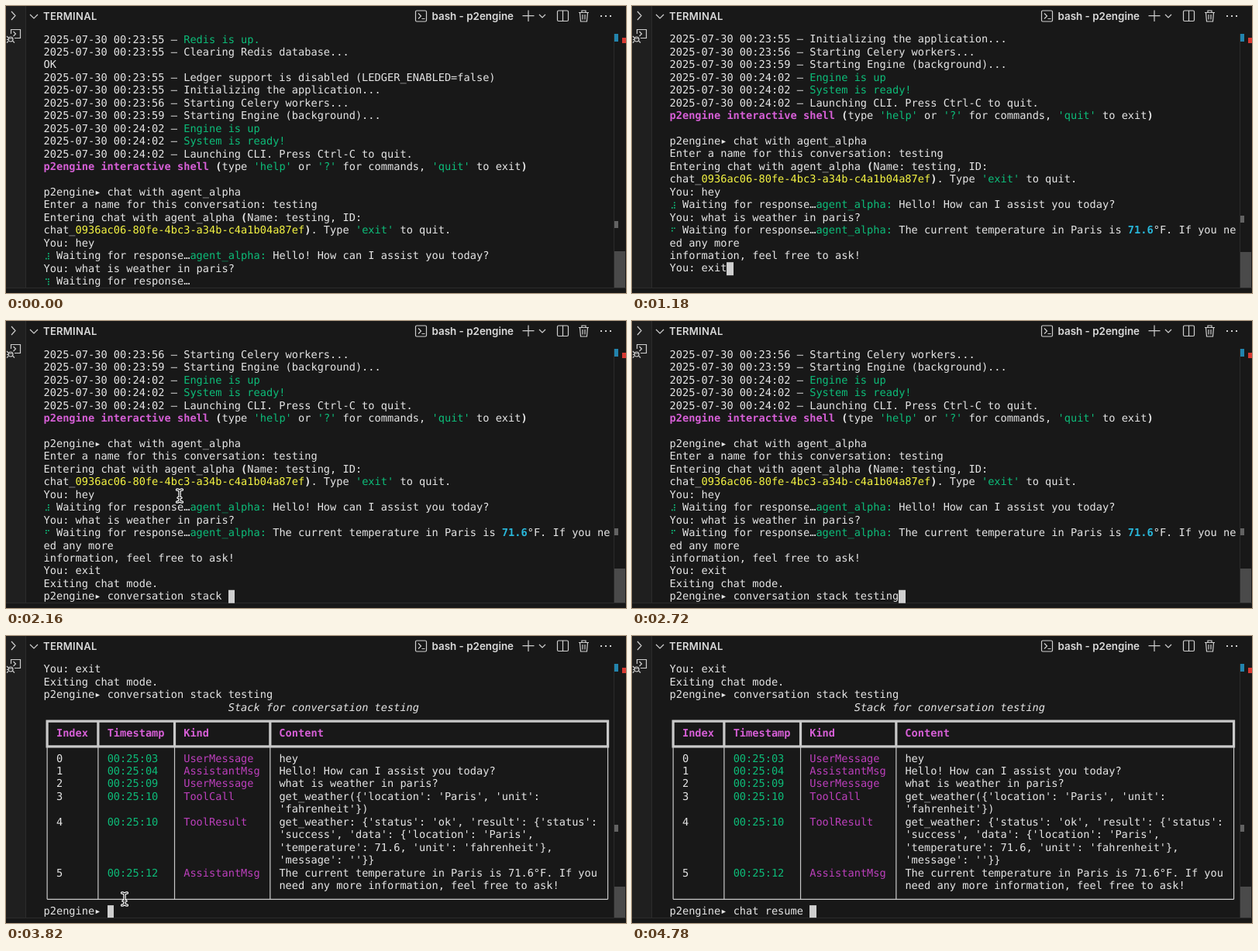
Write an HTML page that moves like this. It is 800 by 371 pixels and loops after 4800 ms.

```html
<!DOCTYPE html>
<html lang="en">
<head>
<meta charset="utf-8">
<title>Terminal session</title>
<style>
html, body { margin: 0; width: 100%; height: 100%; overflow: hidden; background: #181818; }
#stage { position: relative; width: 800px; height: 371px; overflow: hidden; background: #181818; }
#chrome, #mouse { position: absolute; left: 0; top: 0; }
#chrome text { font: 600 13.4px Inter, sans-serif; fill: #dcdcdc; }
#view { position: absolute; left: 26px; top: 35.5px; width: 758px; height: 329px; overflow: hidden; }
#log { position: absolute; left: 22.5px; top: 0; color: #e5e5e5;
  font: 13.655px/16.45px "DejaVu Sans Mono", monospace; text-rendering: geometricPrecision; white-space: pre; }
.row { position: absolute; left: 0; height: 16.45px; }
.row i { font-style: normal; }
i.g { color: #0dbc79; }
i.m { color: #bc3fbc; }
i.p { color: #d65fd6; font-weight: bold; }
i.y { color: #f5f543; }
i.c { color: #29b8db; font-weight: bold; }
i.b { font-weight: bold; }
.row i.t { font-style: italic; }
.spin { position: absolute; left: 0; top: 0; fill: #0dbc79; }
#grid { position: absolute; left: 0; overflow: visible; fill: none; stroke: #c9c9c9; }
#caret { position: absolute; width: 8.2px; height: 16.45px; background: #cfcfcf; }
.bar { position: absolute; }
</style>
</head>
<body>
<div id="stage">
  <svg id="chrome" width="800" height="371" fill="none" stroke="#cfcfcf" stroke-width="1.2">
    <path d="M0 0H25V364H0z" fill="#1f1f1f" stroke="none"/>
    <path d="M25.5 0V364M0 364.5H800M784.5 36V364" stroke="#2b2b2b" stroke-width="1"/>
    <path d="M7 7l5 5.5-5 5.5M31 11l5 5 5-5M688 11l4 4 4-4"/>
    <path d="M6.500 36V30.500H18.500V41.500H11M9.500 33l3 3-3 3"/>
    <circle cx="6" cy="43" r="3"/>
    <path d="M1 39l2 2M1 43.500h2M1 47.500l2-2M11 47.500l-2-2M3 42h6"/>
    <rect x="528.500" y="6" width="14" height="14" rx="1.500"/>
    <path d="M532 9.500l3.500 3.500-3.500 3.500M536.500 16.500h4"/>
    <path d="M674 5.500V20M666.500 12.700H681.500"/>
    <rect x="711.500" y="6" width="14" height="13.500" rx="1.500"/>
    <path d="M718.500 6V19.500"/>
    <path d="M739 8.500H752M743 8.500V6H748V8.500M740.500 8.500L741.500 20H749.500L750.500 8.500M744 11V17.500M747 11V17.500"/>
    <path d="M767 13h2m4 0h2m4 0h2" stroke-width="2"/>
    <g stroke="none">
      <text x="48" y="17.500" style="font-size:13px;letter-spacing:.3px">TERMINAL</text>
      <text x="549.500" y="17.700">bash - p2engine</text>
    </g>
  </svg>
  <div id="view"><div id="log"></div></div>
  <div class="bar" style="left:785px;top:36px;width:5px;height:10px;background:#2284ad"></div>
  <div class="bar" style="left:795px;top:41px;width:5px;height:7px;background:#d63a32"></div>
  <div class="bar" id="mark" style="left:785px;width:5px;height:9px;background:#626262"></div>
  <div class="bar" id="thumb" style="left:785px;width:14px;background:#4a4a4a"></div>
  <svg id="mouse" width="12" height="20" viewBox="-6 -10 12 20" fill="none" stroke-linecap="round">
    <path id="beam" d="M-3.500-8Q0-8 0-5.500Q0-8 3.500-8M0-5.500V5.500M-3.500 8Q0 8 0 5.500Q0 8 3.500 8M-2 2.500H2" stroke="#fff" stroke-width="3"/>
    <use href="#beam" style="stroke:#000"/>
    <path d="M-3.500-8Q0-8 0-5.500Q0-8 3.500-8M0-5.500V5.500M-3.500 8Q0 8 0 5.500Q0 8 3.500 8M-2 2.500H2" stroke="#111" stroke-width="1.100"/>
  </svg>
</div>
<script>
const LOOP = 4800, ROW = 16.45, COL = 8.221;
const $ = id => document.getElementById(id);
const tag = (c, t) => `<i class="${c}">${t}</i>`;
const stamp = (time, text) => `2025-07-30 00:${time} – ${text}`;

// Braille spinner: each digit is a dot, 1-3 left column, 4-6 right column
const dots = code => [...code].map(n =>
  `M${n > 3 ? 5 : 2} ${4.2 + (n - 1) % 3 * 3.3}h1.7v1.7h-1.7z`).join('');
const spin = (code, id = '') =>
  `<svg class="spin" width="9" height="16"><path ${id} d="${dots(code)}"/></svg>`;
const SPIN = ['1456', '456', '3456', '356', '236', '1236', '123', '1234', '124', '145'];
const wait = '  Waiting for response…';
const agent = tag('g', 'agent_alpha:');
const prompt = 'p2engine▸ ';

const cells = (i, time, kind, text) =>
  '  ' + i.padEnd(8) + tag('g', time.padEnd(12)) + tag('m', kind.padEnd(15)) + text;
const more = text => cells('', '', '', text);

const lines = [
  stamp('23:55', tag('g', 'Redis is up.')),
  stamp('23:55', 'Clearing Redis database...'),
  'OK',
  stamp('23:55', 'Ledger support is disabled (LEDGER_ENABLED=false)'),
  stamp('23:55', 'Initializing the application...'),
  stamp('23:56', 'Starting Celery workers...'),
  stamp('23:59', 'Starting Engine (background)...'),
  stamp('24:02', tag('g', 'Engine is up')),
  stamp('24:02', tag('g', 'System is ready!')),
  stamp('24:02', 'Launching CLI. Press Ctrl-C to quit.'),
  tag('p', 'p2engine interactive shell') + tag('b', ' (') + 'type ' + tag('g', "'help'") + ' or ' +
    tag('g', "'?'") + ' for commands, ' + tag('g', "'quit'") + ' to exit' + tag('b', ')'),
  '',
  prompt + 'chat with agent_alpha',
  'Enter a name for this conversation: testing',
  'Entering chat with agent_alpha ' + tag('b', '(') + 'Name: testing, ID:',
  'chat_' + tag('y', '0936ac06-80fe-4bc3-a34b-c4a1b04a87ef') + tag('b', ')') + '. Type ' +
    tag('g', "'exit'") + ' to quit.',
  'You: hey',
  spin('3456') + wait + agent + ' Hello! How can I assist you today?',
  'You: what is weather in paris?',
  spin('1456', 'id="live"') + wait + '<span id="reply">' + agent +
    ' The current temperature in Paris is ' + tag('c', '71.6') + '°F. If you ne</span>',
  'ed any more',
  'information, feel free to ask!',
  'You: ',
  'Exiting chat mode.',
  prompt,
  ' '.repeat(29) + tag('t', 'Stack for conversation testing'),
  '',
  '  ' + tag('p', 'Index'.padEnd(8) + 'Timestamp'.padEnd(12) + 'Kind'.padEnd(15) + 'Content'),
  '',
  cells('0', '00:25:03', 'UserMessage', 'hey'),
  cells('1', '00:25:04', 'AssistantMsg', 'Hello! How can I assist you today?'),
  cells('2', '00:25:09', 'UserMessage', 'what is weather in paris?'),
  cells('3', '00:25:10', 'ToolCall', "get_weather({'location': 'Paris', 'unit':"),
  more("'fahrenheit'})"),
  cells('4', '00:25:10', 'ToolResult', "get_weather: {'status': 'ok', 'result': {'status':"),
  more("'success', 'data': {'location': 'Paris',"),
  more("'temperature': 71.6, 'unit': 'fahrenheit'},"),
  more("'message': ''}}"),
  cells('5', '00:25:12', 'AssistantMsg', 'The current temperature in Paris is 71.6°F. If you'),
  more('need any more information, feel free to ask!'),
  '',
  prompt
];

// Table borders, placed at the centres of their character cells
const cx = c => (c + .5) * COL, cy = r => (r + .5) * ROW;
const cols = [0, 8, 20, 35, 88].map(cx);
const [top0, mid, end] = [26, 28, 40].map(cy);
const posts = (a, b) => cols.map(x => `M${x} ${a}V${b}`).join('');
const beam = y => `M${cols[0]} ${y}H${cols[4]}`;
const grid = `<svg id="grid" width="740" height="${42 * ROW}">
  <path stroke-width="1.2" d="${posts(mid, end) + beam(end)}"/>
  <path stroke-width="3.2" stroke-linecap="square" d="${posts(top0, mid) + beam(top0) + beam(mid)}"/></svg>`;

$('log').innerHTML = lines.map((t, i) =>
  `<div class="row" style="top:${i * ROW}px">${t}</div>`).join('') +
  grid + '<div id="caret"></div>';
const rows = [...document.querySelectorAll('.row')];

// time, rows scrolled off, last line, scrollbar top, marker top
const steps = [
  [0, 0, 19, 317, 277.5],
  [400, 4, 22, 318, 270.5],
  [1240, 5, 24, 319.5, 268],
  [2800, 22, 41, 324, 243.5]
];
// line, prompt, then [text, start, ms per key]
const inputs = [
  [22, 'You: ', ['exit', 700, 100]],
  [24, prompt, ['conversation stack ', 1480, 25], ['testing', 2340, 50]],
  [41, prompt, ['chat resume ', 4080, 55]]
].map(([line, lead, ...keys]) => {
  const node = document.createTextNode('');
  rows[line].append(node);
  return { line, lead, keys, node };
});
// pointer runs of [time, x, y]; hidden outside them
const runs = [
  [[2060, 232, 250], [2150, 224, 226], [2300, 224, 226]],
  [[3060, 224, 226], [3220, 294, 171], [3400, 294, 171], [3700, 150, 357], [3800, 153, 340], [4080, 153, 340]]
];

function pointer(t) {
  const run = runs.find(r => t >= r[0][0] && t < r[r.length - 1][0]);
  $('mouse').style.display = run ? '' : 'none';
  if (!run) return;
  const i = run.findIndex(p => p[0] > t), a = run[i - 1], b = run[i];
  const u = (t - a[0]) / (b[0] - a[0]), e = u * u * (3 - 2 * u);
  const at = k => a[k] + (b[k] - a[k]) * e;
  $('mouse').style.transform = `translate(${at(1) - 6}px,${at(2) - 10}px)`;
}

function draw(t) {
  const [, scroll, last, thumb, mark] = steps.filter(s => s[0] <= t).pop();
  $('log').style.transform = `translateY(${-scroll * ROW}px)`;
  rows.forEach((r, i) => r.style.display = i <= last ? '' : 'none');
  $('grid').style.display = last > 40 ? '' : 'none';
  $('thumb').style.top = thumb + 'px';
  $('thumb').style.height = 364 - thumb + 'px';
  $('mark').style.top = mark + 'px';

  const waiting = last === 19;
  $('reply').style.display = waiting ? 'none' : '';
  $('live').setAttribute('d', dots(waiting ? SPIN[Math.floor(t / 20) % 10] : '124'));

  $('caret').style.display = waiting ? 'none' : '';
  for (const { line, lead, keys, node } of inputs) {
    const text = keys.map(([s, start, ms]) =>
      s.slice(0, Math.max(0, Math.floor((t - start) / ms)))).join('');
    if (node.data !== text) node.data = text;
    if (line === last) {
      $('caret').style.left = (lead.length + text.length) * COL + 'px';
      $('caret').style.top = line * ROW + 'px';
    }
  }
  pointer(t);
}

const begin = performance.now();
function tick() {
  draw((performance.now() - begin) % LOOP);
  requestAnimationFrame(tick);
}
tick();
</script>
</body>
</html>
```
